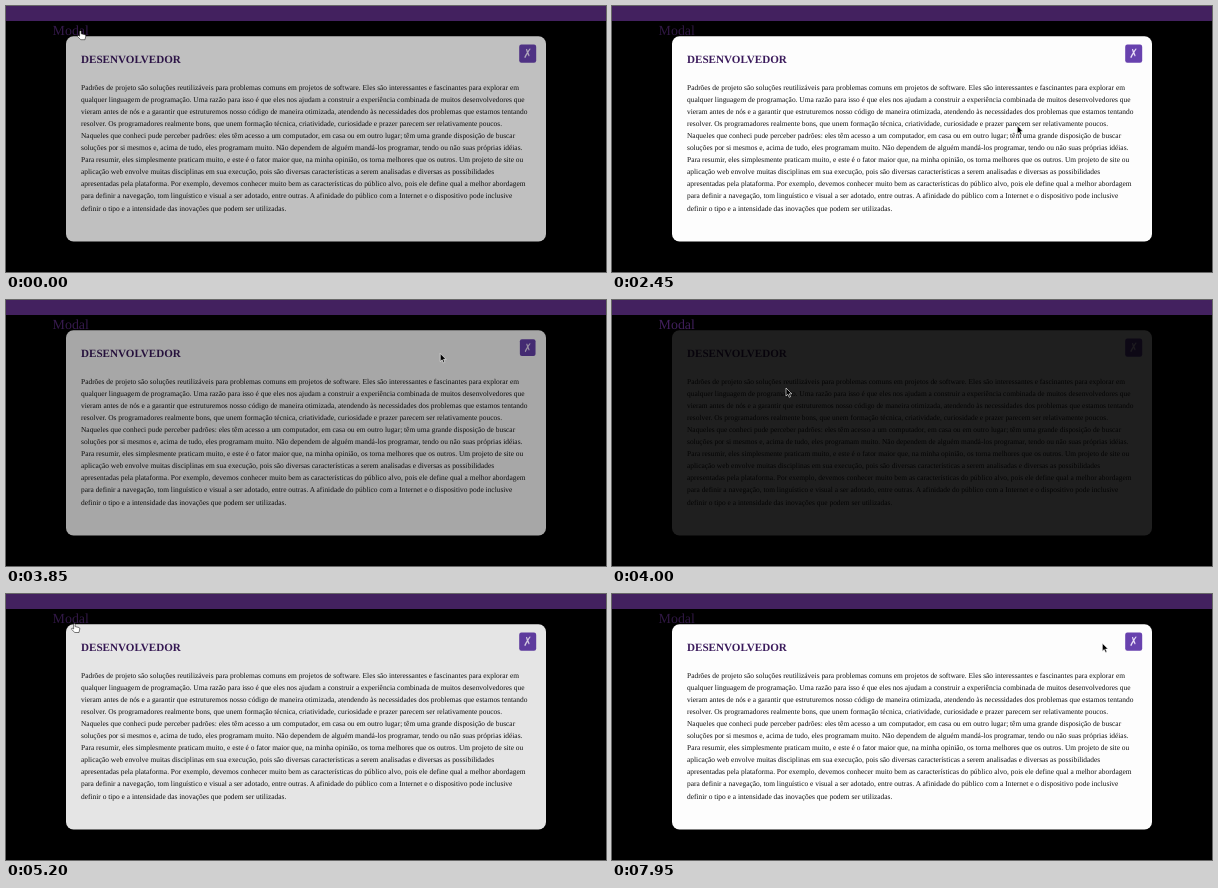
An HTML page for the animation above (8 s loop, 600x266 px).

```html
<!DOCTYPE html>
<html lang="pt">
<head>
<meta charset="utf-8">
<title>Modal</title>
<style>
html, body { margin: 0; width: 100%; height: 100%; overflow: hidden; background: #000; }
svg { display: block; width: 600px; height: 266px; }
text { font-family: "Liberation Serif", "Times New Roman", serif; text-rendering: geometricPrecision; }
#link { font-size: 13.9px; fill: #43215f; }
#title { font-size: 11.1px; font-weight: bold; fill: #3b1b5c; }
#body { font-size: 7.43px; fill: #111; }
#cross { font: bold 13px "DejaVu Sans", sans-serif; fill: #eadff8; text-anchor: middle; }
</style>
</head>
<body>
<svg viewBox="0 0 600 266">
  <rect width="600" height="266"/>
  <rect width="600" height="15" fill="#43215f"/>
  <text id="link" x="46.6" y="28.5">Modal</text>
  <g id="modal">
    <rect x="60" y="30.3" width="480" height="205.2" rx="7.5" fill="#fdfdfd"/>
    <text id="title" x="75" y="57">DESENVOLVEDOR</text>
    <g id="body"></g>
    <g id="button">
      <rect x="513.2" y="38.5" width="17" height="18.3" rx="2.2" fill="#6842ae"/>
      <text id="cross" transform="translate(521.7 52.2) scale(.8 1)">✗</text>
    </g>
  </g>
  <g id="cursor">
    <path id="arrow" d="M0 0V8L1.9 6.3L3.2 9.3L4.6 8.7L3.3 5.8H5.8Z" fill="#000" stroke="#fff" stroke-width=".6"/>
    <path id="hand" d="M1.6 .8Q2.4-.4 3.2.8V3.3L7 4.2Q8 4.5 7.8 5.6L7 9.2H2.8L-.6 5.9Q-.5 4.7 .7 5L1.6 5.7Z" fill="#fff" stroke="#222" stroke-width=".6"/>
  </g>
</svg>
<script>
const LOOP = 8000, STEP = 50;
const $ = id => document.getElementById(id);

const lines = [
  "Padrões de projeto são soluções reutilizáveis para problemas comuns em projetos de software. Eles são interessantes e fascinantes para explorar em",
  "qualquer linguagem de programação. Uma razão para isso é que eles nos ajudam a construir a experiência combinada de muitos desenvolvedores que",
  "vieram antes de nós e a garantir que estruturemos nosso código de maneira otimizada, atendendo às necessidades dos problemas que estamos tentando",
  "resolver. Os programadores realmente bons, que unem formação técnica, criatividade, curiosidade e prazer parecem ser relativamente poucos.",
  "Naqueles que conheci pude perceber padrões: eles têm acesso a um computador, em casa ou em outro lugar; têm uma grande disposição de buscar",
  "soluções por si mesmos e, acima de tudo, eles programam muito. Não dependem de alguém mandá-los programar, tendo ou não suas próprias idéias.",
  "Para resumir, eles simplesmente praticam muito, e este é o fator maior que, na minha opinião, os torna melhores que os outros. Um projeto de site ou",
  "aplicação web envolve muitas disciplinas em sua execução, pois são diversas características a serem analisadas e diversas as possibilidades",
  "apresentadas pela plataforma. Por exemplo, devemos conhecer muito bem as características do público alvo, pois ele define qual a melhor abordagem",
  "para definir a navegação, tom linguístico e visual a ser adotado, entre outras. A afinidade do público com a Internet e o dispositivo pode inclusive",
  "definir o tipo e a intensidade das inovações que podem ser utilizadas."
];
lines.forEach((line, i) => {
  const el = document.createElementNS("http://www.w3.org/2000/svg", "text");
  el.setAttribute("x", 75);
  el.setAttribute("y", 83.5 + i * 12.1);
  el.textContent = line;
  $("body").append(el);
});

// Pointer stops: time, x, y
const stops = [
  [0, 72, 24.5], [300, 72, 24.5], [700, 110, 85], [1050, 166, 149],
  [1750, 290, 165], [2600, 430, 110], [3400, 521, 42], [3800, 521, 42],
  [4000, 174, 88], [4200, 174, 88], [4600, 66, 29.3], [5200, 66, 29.3],
  [5900, 215, 143], [6300, 341, 133], [6650, 500, 58], [7150, 507, 50],
  [7550, 493, 51], [8000, 490, 49]
];

const clamp = u => Math.min(1, Math.max(0, u));
const ramp = (t, start, length) => clamp((t - start) / length);
const mix = (a, b, u) => a + (b - a) * u;

function bezier(x1, y1, x2, y2) {
  const at = (a, b, s) => 3 * a * s * (1 - s) ** 2 + 3 * b * s * s * (1 - s) + s ** 3;
  return u => {
    let lo = 0, hi = 1;
    for (let i = 0; i < 20; i++) {
      const mid = (lo + hi) / 2;
      if (at(x1, x2, mid) < u) lo = mid; else hi = mid;
    }
    return at(y1, y2, (lo + hi) / 2);
  };
}
const ease = bezier(.25, .1, .25, 1);
const easeInOut = bezier(.42, 0, .58, 1);

function fade(t) {
  if (t < 3675) return ease(ramp(t, -184, 400));
  if (t < 4946) return 1 - easeInOut(ramp(t, 3675, 430));
  return ease(ramp(t, 4946, 400));
}

function pointer(t) {
  const i = stops.findIndex(s => s[0] > t);
  const [a, b] = [stops[i - 1], stops[i]];
  const u = ramp(t, a[0], b[0] - a[0]);
  return [mix(a[1], b[1], u), mix(a[2], b[2], u)];
}

const inside = (x, y, l, t, r, b) => x >= l && x <= r && y >= t && y <= b;

function draw(t) {
  const shown = fade(t);
  $("modal").setAttribute("opacity", shown);
  $("link").setAttribute("opacity", 1 - .3 * shown);

  const press = ramp(t, 3350, 150) - ramp(t, 3760, 140);
  $("button").setAttribute("transform",
    `translate(521.7 47.7) scale(${1 - .22 * press}) translate(-521.7 -47.7)`);

  const [x, y] = pointer(t);
  const hover = inside(x, y, 46, 16, 84, 31) || inside(x, y, 513, 38, 530, 57);
  $("cursor").setAttribute("transform", `translate(${x} ${y})`);
  $("arrow").setAttribute("visibility", hover ? "hidden" : "visible");
  $("hand").setAttribute("visibility", hover ? "visible" : "hidden");
}

const begin = performance.now();
function tick() {
  const t = (performance.now() - begin) % LOOP;
  draw(Math.floor(t / STEP) * STEP);
  requestAnimationFrame(tick);
}
tick();
</script>
</body>
</html>
```
